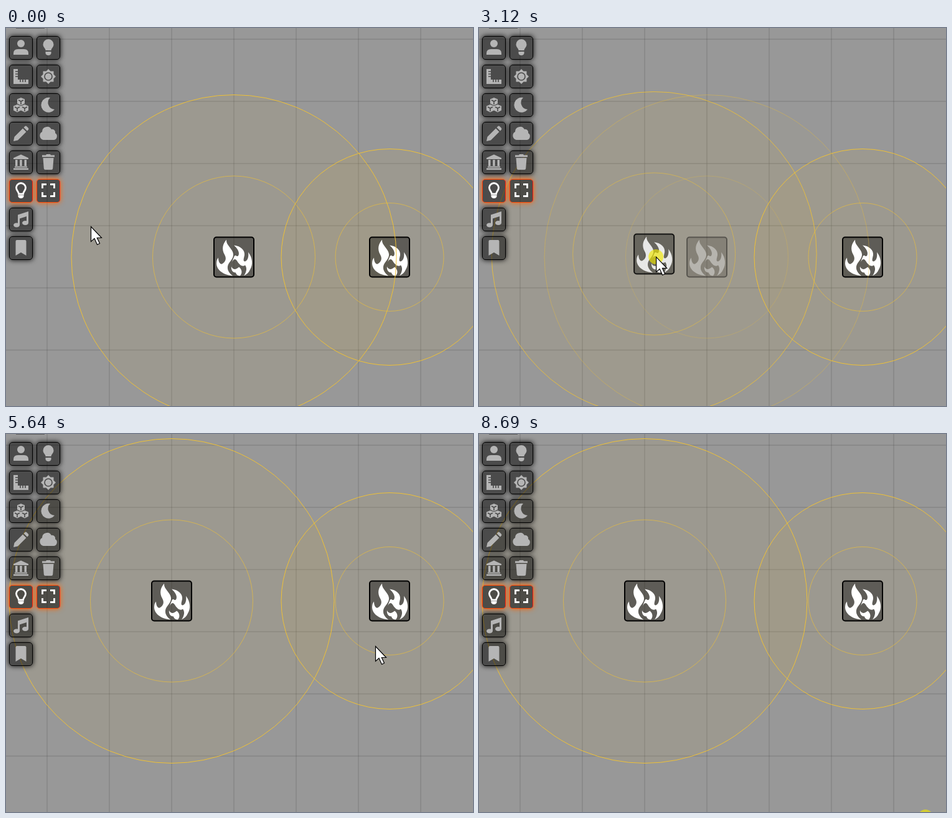
Recreate the animation shown at these times as an HTML page with a canvas. Size 750 by 608 pixels, loop 8.76 s.

```html
<!DOCTYPE html>
<html lang="en">
<head>
<meta charset="utf-8">
<title>Moving lights</title>
<style>
  html, body { margin: 0; width: 100%; height: 100%; overflow: hidden; background: #989898; }
  #scene, #pointer { position: absolute; left: 0; top: 0; }
  #tab { position: absolute; left: 16px; top: 0; width: 46px; height: 1px; background: #5c5c5c; }
  .tool {
    position: absolute; width: 36px; height: 36px; border: 1px solid #000; border-radius: 5px;
    background: rgba(0, 0, 0, .5); box-shadow: 0 0 9px #000; color: #b5b5b5;
  }
  .tool.on { border-color: #ff4a08 #f81c10 #ff4a08 #ff3a08; box-shadow: 0 0 9px #ff6400; color: #fff; }
  .tool svg { position: absolute; left: -1px; top: -1px; fill: currentColor; }
  .cut { fill: none; stroke: #4a4a4a; stroke-width: 1.6; }
  .line { fill: none; stroke: currentColor; stroke-width: 2.8; }
</style>
</head>
<body>
<canvas id="scene" width="750" height="608"></canvas>
<div id="tab"></div>
<svg id="pointer" width="750" height="608">
  <g id="cursor" stroke="#000" stroke-width="1.2" fill="#fff">
    <circle id="dot" r="12" fill="#f0e600" fill-opacity=".65" stroke="none"/>
    <path id="arrow" d="M.5 .5V24.500L6 19.500 10.500 29.500 14.500 27.500 10.300 18.500H17.500Z"/>
    <path id="hand" d="M-1.500 17V2a2 2 0 0 1 4 0v9l12 2.500q3 1 3 4v5l-3 8H1l-5-9q-1-4 2.500-2z"/>
  </g>
</svg>
<script>
const $ = id => document.getElementById(id);
const path = (d, cls = '') => `<path class="${cls}" d="${d}"/>`;
const cube = (x, y) => path(`M${x} ${y - 6}l6 2.500v7l-6 3-6-3v-7z`) +
  path(`M${x - 4} ${y - 2}l4 2 4-2M${x} ${y}v5`, 'cut');

const columns = [
  [
    '<circle cx="19" cy="12" r="6"/>' + path('M7 30v-2q0-7 7-7h10q7 0 7 7v2z'),
    path('M7 7h7v17h17v7H7z') + path('M10 11h4M10 15h4M10 19h4M18 24v4M22 24v4M26 24v4', 'cut'),
    cube(19, 13) + cube(13, 24) + cube(25, 24),
    path('M7 31l1.500-7L22 10.500l5.500 5.500L14 29.500zM23.500 9l2-2q1.500-1 3 .5l2 2q1.500 1.500 .5 3l-2 2z'),
    path('M19 6.500L31 12v2H7v-2zM10 15h3.500v10H10zM17.200 15h3.500v10h-3.500zM24.500 15H28v10h-3.500zM9 25.500h20v2H9zM7 28.500h24v2.500H7z'),
    path('M15.500 24c0-4-4-5-4-10a7.500 7.500 0 0 1 15 0c0 5-4 6-4 10z', 'line') +
      path('M14.500 26h9v2q-1 3-4.500 3t-4.500-3z'),
    path('M14 11.500L31 6v18h-3V14l-11 3.500V28h-3z') +
      '<ellipse cx="12" cy="28" rx="5" ry="3.500"/><ellipse cx="26" cy="24.500" rx="5" ry="3.500"/>',
    path('M10.500 8q0-2 2-2h13q2 0 2 2v23L19 26l-8.500 5z')
  ],
  [
    path('M14.500 23c0-3.500-4-5-4-9.500a8.500 8.500 0 0 1 17 0c0 4.500-4 6-4 9.500zM14.500 25h9v3q-1 3-4.500 3t-4.500-3z'),
    path('M10.500 10.500h17v17h-17zM19 7l12 12-12 12L7 19z') + '<circle class="cut" cx="19" cy="19" r="6"/>',
    path('M22 7A12 12 0 1 0 29 26A11 11 0 0 1 22 7z'),
    path('M11 29a7 7 0 0 1-2-13a8 8 0 0 1 15-4a5 5 0 0 1 6 6a6 6 0 0 1-2 11z'),
    path('M9 7.500h6l1-1.500h6l1 1.500h6v3H9zM10.500 12h17l-1.300 17q-.2 2-2.200 2H14q-2 0-2.200-2z'),
    path('M9.500 15V8.500H16M22 8.500h6.500V15M28.500 21v6.500H22M16 27.500H9.500V21', 'line')
  ]
];
let tools = '';
columns.forEach((icons, c) => icons.forEach((icon, r) => {
  tools += `<div class="tool${r === 5 ? ' on' : ''}" style="left:${5 + 44 * c}px;top:${13 + 46 * r}px">` +
    `<svg width="38" height="38">${icon}</svg></div>`;
}));
$('tab').insertAdjacentHTML('afterend', tools);

// The picture advances in ticks. Each gesture travels to a point, then may
// press there and drag: a selection box, or lights that snap by a shift.
const LOOP = 8760, TICK = 78.2, START = [136, 319];
const gestures = [
  { move: [0, 4], at: [68, 263], press: [7, 8] },
  { move: [12, 15], at: [260, 281], press: [25, 29], to: [460, 434], box: true },
  { move: [30, 36], at: [369, 373], press: [37, 43], to: [268, 367], ids: [0], shift: [-100, 0] },
  { move: [43, 46], at: [205, 310], press: [46, 51], to: [665, 430], box: true },
  { move: [51, 55], at: [615, 392], press: [58, 65], to: [610, 292], ids: [0, 1], shift: [0, -100] },
  { move: [66, 72], at: [593, 341] },
  { move: [72, 74], at: [474, 461], press: [74, 75] },
  { move: [75, 78], at: [617, 262], press: [79, 86], to: [608, 402], ids: [1], shift: [0, 150] },
  { move: [86, 87], at: [608, 402], press: [94, 99], to: [596, 253], ids: [1], shift: [0, -150] },
  { move: [99, 102], at: [594, 423] },
  { move: [102, 108], at: [717, 616], press: [111, 112] }
];
const during = (n, [a, b]) => n >= a && n < b;
const easeOut = (n, a, b) => 1 - (1 - Math.min(1, (n - a) / (b - a))) ** 2;
const mix = (p, q, k) => p.map((v, i) => v + (q[i] - v) * k);

function cursorAt(n) {
  let pos = START;
  for (const { move, at, press, to } of gestures) {
    if (n <= move[0]) break;
    pos = mix(pos, at, easeOut(n, ...move));
    if (to && n > press[0]) pos = mix(at, to, easeOut(n, press[0], press[1] - 1));
  }
  return pos;
}

const g = $('scene').getContext('2d');
const flame = new Path2D(
  'M21 5C20 14 31 19 32 28C33 36 24 41 23 48C22 55 27 60 31 63C17 62 5 54 5 43C5 39 6 36 8 34' +
  'C8 41 11 45 14 44C19 41 22 36 18 29C13 20 15 12 21 5Z' +
  'M33 14C44 15 51 22 50 30C49 35 47 40 51 40C56 38 57 31 56 25C63 34 64 45 59 53C57 58 53 61 49 63' +
  'C54 56 54 50 51 46C46 50 41 44 38 39C35 34 32 37 30 41C34 31 34 29 37 31C41 34 45 24 33 14Z' +
  'M29 48C30 52 35 55 41 49C46 52 47 59 43 63C40 63 37 62 36 58C31 58 28 53 29 48Z');

function circle(x, y, r) {
  g.beginPath();
  g.arc(x, y, r, 0, 7);
}

function drawField({ x, y, r }) {
  circle(x, y, r);
  g.fillStyle = 'rgba(200,165,72,.09)';
  g.fill();
}

function drawIcon({ x, y, hover }) {
  g.save();
  g.translate(x - 33, y - 33);
  g.beginPath();
  g.roundRect(1, 1, 64, 64, 4);
  g.fillStyle = 'rgba(0,0,0,.4)';
  g.fill();
  g.fillStyle = '#fff';
  g.fill(flame);
  g.strokeStyle = hover ? '#ff5a10' : '#000';
  g.lineWidth = 2;
  g.stroke();
  g.restore();
}

function drawRings({ x, y, r }) {
  g.lineWidth = 1;
  g.strokeStyle = '#efc136';
  circle(x, y, r);
  g.stroke();
  g.strokeStyle = 'rgba(239,193,54,.65)';
  circle(x, y, r / 2);
  g.stroke();
}

function lightsAt(n, [tx, ty]) {
  const lights = [{ x: 366, y: 368.5, r: 261 }, { x: 616, y: 368.5, r: 174 }];
  let active = null;
  for (const d of gestures.filter(d => d.ids)) {
    if (n >= d.press[1]) d.ids.forEach(i => { lights[i].x += d.shift[0]; lights[i].y += d.shift[1]; });
    else if (n > d.press[0]) active = d;
  }
  for (const l of lights) {
    l.alpha = 1;
    l.hover = !active && Math.abs(tx - l.x) < 33 && Math.abs(ty - l.y) < 33;
  }
  const ghosts = active ? active.ids.map(i => {
    const { x, y, r } = lights[i], [gx, gy] = active.at;
    lights[i].alpha = .4;
    return { x: x + tx - gx, y: y + ty - gy, r, alpha: .85 };
  }) : [];
  return [...lights, ...ghosts];
}

function draw(n) {
  const tip = cursorAt(n);
  g.fillStyle = '#989898';
  g.fillRect(0, 0, 750, 608);
  g.fillStyle = 'rgba(0,0,0,.18)';
  for (let x = 65.5; x < 750; x += 100) g.fillRect(x, 0, 1, 608);
  for (let y = 17.5; y < 608; y += 100) g.fillRect(0, y, 750, 1);

  const lights = lightsAt(n, tip);
  for (const paint of [drawField, drawIcon, drawRings]) {
    for (const l of lights) {
      g.globalAlpha = l.alpha;
      paint(l);
    }
  }
  g.globalAlpha = 1;

  const held = gestures.find(s => s.press && during(n, s.press));
  if (held && held.box) {
    const [x, y] = held.at;
    g.strokeStyle = '#ff9829';
    g.lineWidth = 3;
    g.strokeRect(x + 1, y, tip[0] - x - 1.5, tip[1] - y - 1.5);
  }

  const show = (id, on) => $(id).setAttribute('visibility', on ? 'visible' : 'hidden');
  const onTool = tip[0] < 88 && tip[1] < 282;
  $('cursor').setAttribute('transform', `translate(${tip})`);
  show('dot', held);
  show('hand', onTool);
  show('arrow', !onTool);
}

function frame() {
  draw(Math.min(111, Math.floor(performance.now() % LOOP / TICK + .15)));
  requestAnimationFrame(frame);
}
frame();
</script>
</body>
</html>
```
